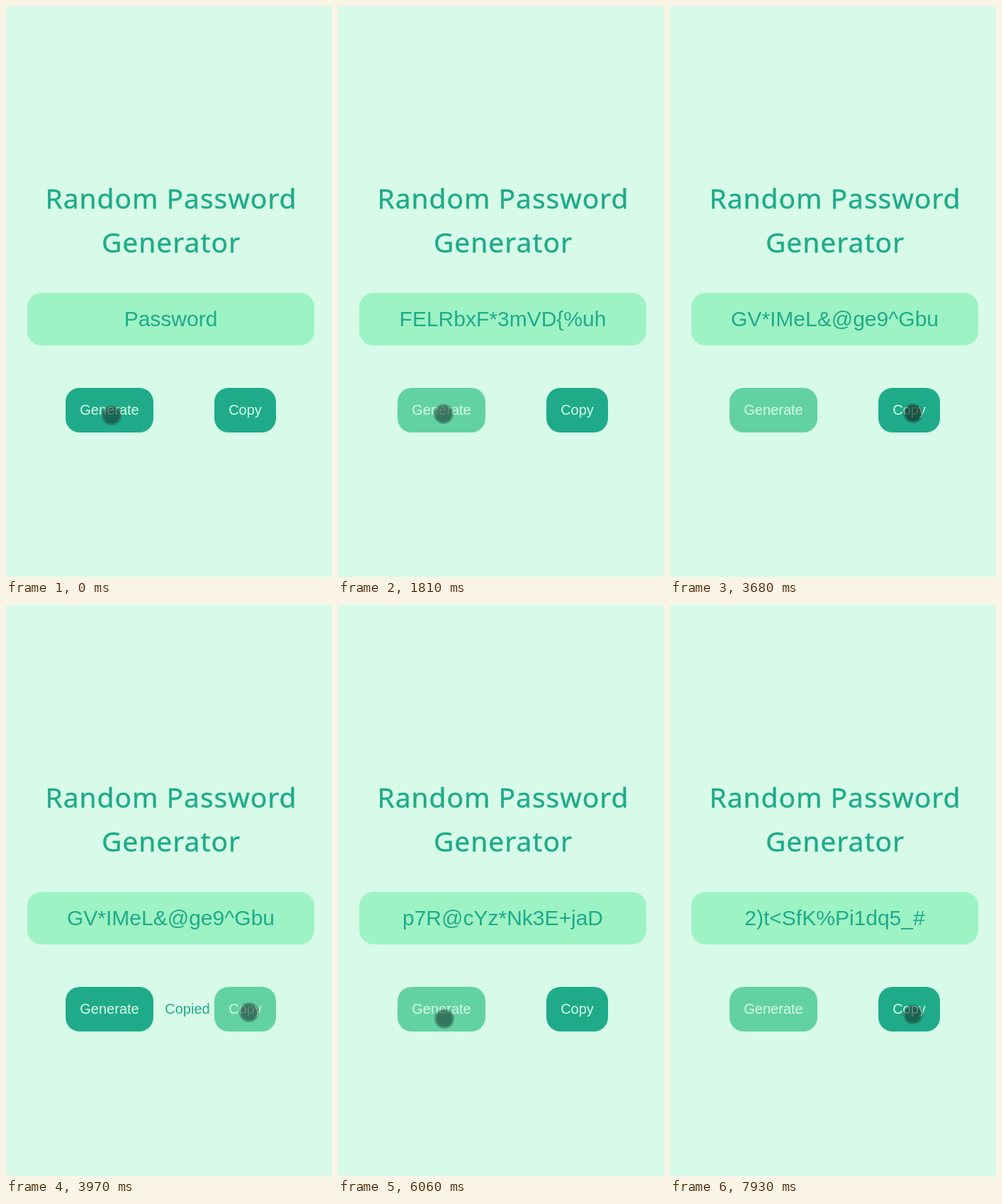
These frames come from a looping animation (460x806 px, 8 s). An HTML page:

```html
<!DOCTYPE html>
<html lang="en">
<head>
<meta charset="utf-8">
<title>Random Password Generator</title>
<style>
  :root { --pale: #d7fbe8; --mint: #9df3c4; --light: #62d2a2; --dark: #1fab89; }
  html, body { margin: 0; width: 100%; height: 100%; overflow: hidden; background: var(--pale); }
  svg { display: block; width: 460px; height: 806px; }
  text { font: 20px "Liberation Sans", Arial, sans-serif; text-anchor: middle; fill: var(--dark); }
  .title text {
    font: 39px "Noto Sans", "Open Sans", sans-serif; letter-spacing: .95px;
    stroke: var(--dark); stroke-width: .4;
  }
  .field rect { fill: var(--mint); }
  .field text { font-size: 30px; opacity: 0; }
  .button rect { fill: var(--dark); }
  .button text { fill: var(--pale); }
  .tap { opacity: 0; }
  .copied { opacity: 0; }

  /* Hard state changes share one 8 s clock */
  .field text, .button rect, .tap, .copied, .disc { animation: 8s step-end infinite; }
  .field .p0 { animation-name: p0; }
  .field .p1 { animation-name: p1; }
  .field .p2 { animation-name: p2; }
  .field .p3 { animation-name: p3; }
  .field .p4 { animation-name: p4; }
  .field .p5 { animation-name: p5; }
  .generate rect { animation-name: generate; }
  .copy rect { animation-name: copy; }
  .tap.on-generate { animation-name: tap-generate; }
  .tap.on-copy { animation-name: tap-copy; }
  .copied { animation-name: copied; }
  .disc { fill: #14302a; fill-opacity: .57; animation-name: press; }
  .ring { fill: none; stroke: #28483c; stroke-opacity: .4; stroke-width: 2.5; }
  .cursor { animation: move 8s linear infinite; }

  @keyframes p0 { 0% { opacity: 1 } 6.625%, 100% { opacity: 0 } }
  @keyframes p1 { 0% { opacity: 0 } 6.625% { opacity: 1 } 20.875%, 100% { opacity: 0 } }
  @keyframes p2 { 0% { opacity: 0 } 20.875% { opacity: 1 } 36%, 100% { opacity: 0 } }
  @keyframes p3 { 0% { opacity: 0 } 36% { opacity: 1 } 73.875%, 100% { opacity: 0 } }
  @keyframes p4 { 0% { opacity: 0 } 73.875% { opacity: 1 } 87.5%, 100% { opacity: 0 } }
  @keyframes p5 { 0% { opacity: 0 } 87.5%, 100% { opacity: 1 } }
  @keyframes generate {
    0%, 47.625% { fill: var(--dark) }
    6.625%, 73.875%, 100% { fill: var(--light) }
  }
  @keyframes copy {
    0%, 73.875%, 100% { fill: var(--dark) }
    47.625% { fill: var(--light) }
  }
  @keyframes copied { 0%, 60.375%, 100% { opacity: 0 } 47.625% { opacity: 1 } }
  @keyframes tap-generate {
    0%, 7.5%, 21.75%, 36.6%, 74.75%, 88.125%, 100% { opacity: 0 }
    5.875%, 20.125%, 35.25%, 73.125%, 86.5% { opacity: .18 }
  }
  @keyframes tap-copy { 0%, 48.5%, 100% { opacity: 0 } 46.875% { opacity: .18 } }
  @keyframes press {
    0%, 7.5%, 21.75%, 36%, 48.5%, 74.75%, 88.125%, 100% { fill-opacity: .57 }
    5%, 19.25%, 34.375%, 46%, 72.25%, 85.625% { fill-opacity: .7 }
  }
  @keyframes move {
    0% { transform: translate(149px, 578px); animation-timing-function: step-end }
    .875%, 35.6% { transform: translate(149px, 576px) }
    36.75% { transform: translate(179px, 576px); animation-timing-function: ease-out }
    42.75%, 60.375% { transform: translate(343px, 575px); animation-timing-function: ease-in-out }
    68.125%, 93.5% { transform: translate(150px, 584px) }
    95.25% { transform: translate(205px, 598px) }
    96.5% { transform: translate(260px, 600px) }
    98.25% { transform: translate(327px, 593px) }
    99.125%, 100% { transform: translate(343px, 578px) }
  }
</style>
</head>
<body>
<svg viewBox="0 0 460 806">
  <g class="title">
    <text x="233" y="286">Random Password</text>
    <text x="233" y="348">Generator</text>
  </g>
  <g class="field">
    <rect x="30" y="405" width="405" height="74" rx="20"/>
    <text class="p0" x="232.5" y="452">Password</text>
    <text class="p1" x="232.5" y="452">HrW&amp;8uxK=d%Te4Bn</text>
    <text class="p2" x="232.5" y="452">FELRbxF*3mVD{%uh</text>
    <text class="p3" x="232.5" y="452">GV*IMeL&amp;@ge9^Gbu</text>
    <text class="p4" x="232.5" y="452">p7R@cYz*Nk3E+jaD</text>
    <text class="p5" x="232.5" y="452">2)t&lt;SfK%Pi1dq5_#</text>
  </g>
  <g class="button generate">
    <rect x="84" y="539" width="124" height="63" rx="20"/>
    <text x="146" y="577">Generate</text>
  </g>
  <text class="copied" x="256" y="577">Copied</text>
  <g class="button copy">
    <rect x="294" y="539" width="87" height="63" rx="20"/>
    <text x="337.5" y="577">Copy</text>
  </g>
  <rect class="tap on-generate" x="84" y="539" width="124" height="63"/>
  <rect class="tap on-copy" x="294" y="539" width="87" height="63"/>
  <g class="cursor">
    <circle class="ring" r="12.75"/>
    <circle class="disc" r="11.5"/>
  </g>
</svg>
</body>
</html>
```
